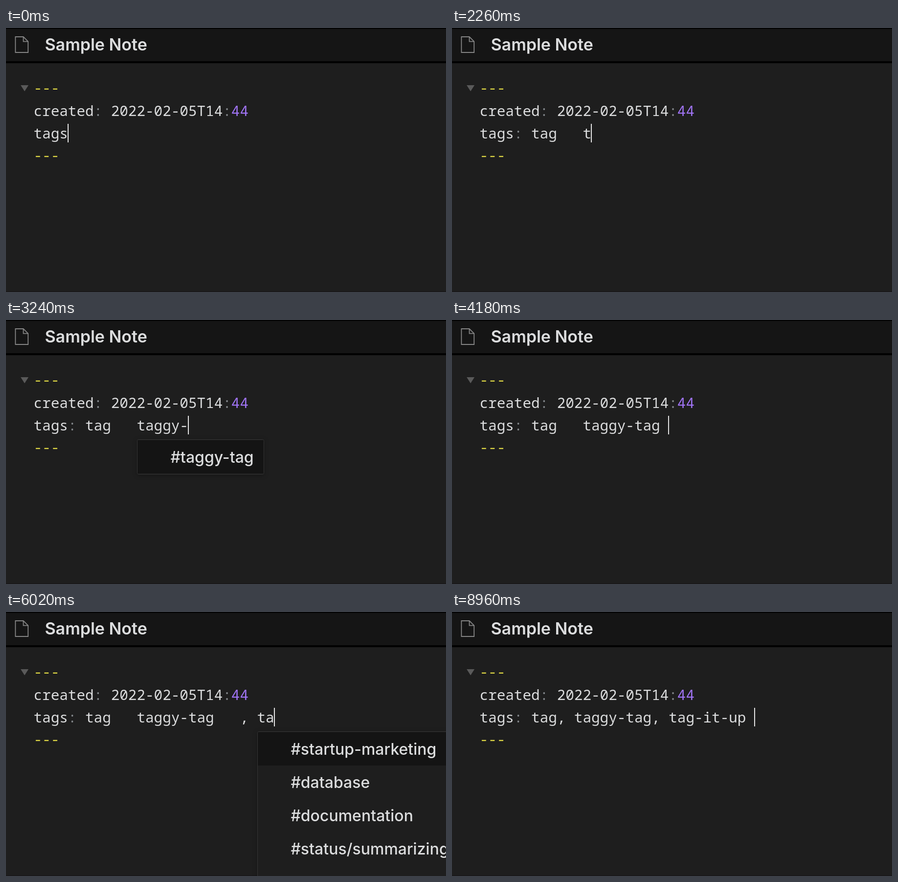
An HTML page for the animation above (9.4 s loop, 900 px wide and 540 px high).

```html
<!DOCTYPE html>
<html lang="en">
<head>
<meta charset="utf-8">
<title>Tag completion</title>
<style>
  html, body { margin: 0; width: 100%; height: 100%; overflow: hidden; background: #1e1e1e; }
  svg { display: block; width: 900px; height: 540px; }
  text { white-space: pre; fill: #dcddde; font-optical-sizing: none; }
  .title { font: 620 34px Inter, sans-serif; }
  .code { font: 350 29.3px "Noto Sans Mono", monospace; }
  .item { font: 450 32px Inter, sans-serif; }
  .fence { fill: #dcd544; }
  .colon { fill: #82868a; }
  .number { fill: #a074f5; }
  .menu { filter: drop-shadow(0 2px 5px rgba(0, 0, 0, .28)); }
</style>
</head>
<body>
<svg viewBox="0 0 900 540">
  <rect width="900" height="540" fill="#1e1e1e"/>
  <rect y="538" width="900" height="2" fill="#1a191a"/>
  <rect width="900" height="72" fill="#000"/>
  <rect y="2" width="900" height="66" fill="#151515"/>
  <path d="M19.3 18H35.5L45.2 27.7V50H19.3ZM35.5 18V27.7H45.2" fill="none" stroke="#858585" stroke-width="1.8"/>
  <text class="title" x="79.5" y="46">Sample Note</text>
  <path d="M30 117H46L38 129.5Z" fill="#5a5a5a"/>
  <g class="code">
    <text class="fence" x="56.5" y="132.7">---</text>
    <text x="56.5" y="180">created<tspan class="colon">:</tspan> 2022-02-05T14<tspan class="colon">:</tspan><tspan class="number">44</tspan></text>
    <text x="56.5" y="226">tags<tspan class="colon" id="colon"></tspan><tspan id="value"></tspan></text>
    <text class="fence" x="56.5" y="270.7">---</text>
  </g>
  <rect id="caret" y="196" width="2" height="38" fill="#e4e4e4"/>
  <g id="menu" class="menu"></g>
</svg>
<script>
const LOOP = 9400, CHAR = 17.58, TEXT_X = 56.3, ROW = 68;
const byId = id => document.getElementById(id);

const matches = ["#startup-marketing", "#database", "#documentation", "#status/summarizing"];
const lists = {
  t: { items: matches, width: 621, scroll: true },
  ta: { items: matches, width: 426, scroll: true },
  tag: { items: ["#tag", "#taggy-tag", "#tag-it-up"], width: 260 },
  tagg: { items: ["#taggy-tag"], width: 260 }
};

const one = " tag", two = one + "   taggy-tag", three = two + "   , ";
const done = " tag, taggy-tag, tag-it-up ";
// time, text after the colon, open list, word column, selected row
const steps = [
  [0, null],
  [120, ""],
  [260, " "],
  [680, " t"],
  [760, " t", "t", 6],
  [820, " ta", "t", 6],
  [840, " ta", "ta", 6],
  [960, one, "ta", 6],
  [980, one, "tag", 6],
  [1400, one + " "],
  [1700, one + "  "],
  [1960, one + "   "],
  [2260, one + "   t"],
  [2360, one + "   t", "t", 12],
  [2420, one + "   ta", "ta", 12],
  [2580, one + "   tag", "tag", 12],
  [2760, one + "   tagg", "tagg", 12],
  [2920, one + "   taggy", "tagg", 12],
  [3240, one + "   taggy-", "tagg", 12],
  [3400, one + "   taggy-t", "tagg", 12],
  [3560, one + "   taggy-ta", "tagg", 12],
  [3720, two, "tagg", 12],
  [4080, two + " "],
  [4340, two + "  "],
  [4620, two + "   "],
  [5060, two + "   ,"],
  [5180, three],
  [5740, three + "t"],
  [5840, three + "t", "t", 26],
  [6000, three + "ta", "ta", 26],
  [6140, three + "tag", "tag", 26],
  [6300, three + "tag", "tag", 26, 1],
  [6440, three + "tag", "tag", 26, 2],
  [6580, three + "tag-it-up "],
  [7280, done]
];

const box = (x, y, w, h, fill, more = "") =>
  `<rect x="${x}" y="${y}" width="${w}" height="${h}" fill="${fill}" ${more}/>`;

function menuMarkup(name, column, selected = 0) {
  if (!name) return "";
  const { items, width, scroll } = lists[name];
  const x = Math.round(TEXT_X + column * CHAR) + 1;
  const height = scroll ? 400 : items.length * ROW + 4;
  const inner = width - (scroll ? 22 : 2);
  return box(x + .5, 244.5, width - 1, height - 1, "#1e1e1e", 'stroke="#353535" rx="3"')
    + box(x + 1, 246 + selected * ROW, inner, ROW, "#141414")
    + (scroll ? box(x + width - 21, 246, 21, 400, "#383838", 'rx="7"') : "")
    + items.map((label, i) =>
        `<text class="item" x="${x + 68.4}" y="${292 + i * ROW}">${label}</text>`).join("");
}

let shown;
function show(step) {
  if (step === shown) return;
  shown = step;
  const [, value, list, column, selected] = step;
  byId("colon").textContent = value === null ? "" : ":";
  byId("value").textContent = value || "";
  const length = value === null ? 4 : 5 + value.length;
  byId("caret").setAttribute("x", Math.round(TEXT_X + length * CHAR) - 1);
  byId("menu").innerHTML = menuMarkup(list, column, selected);
}

function frame() {
  const t = performance.now() % LOOP;
  show(steps.findLast(step => step[0] <= t));
  byId("caret").style.opacity = t >= 8120 && t < 8960 ? 0 : 1;
  requestAnimationFrame(frame);
}
frame();
</script>
</body>
</html>
```
